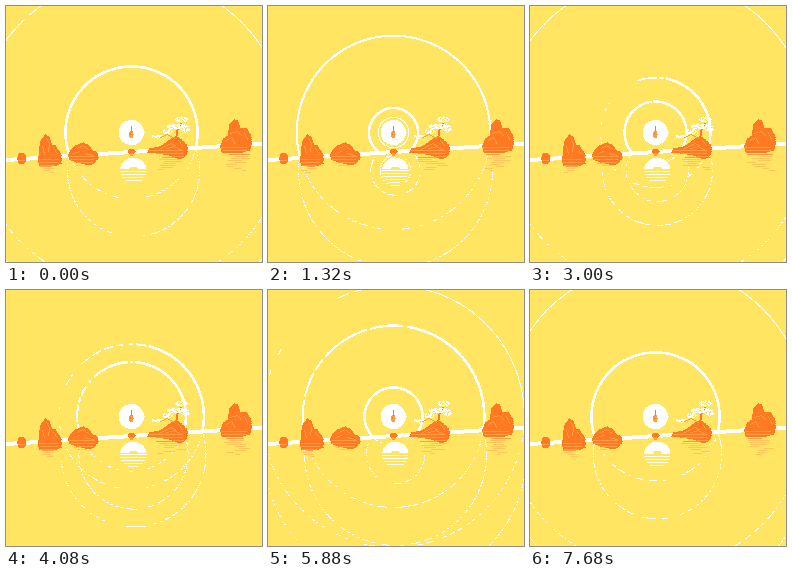
An HTML page with a canvas that plays this animation: 256 px wide and 256 px high, repeating every 7.8 s.

```html
<!DOCTYPE html>
<html lang="en">
<head>
<meta charset="utf-8">
<title>Ripples over still water</title>
<style>
html, body { margin: 0; width: 100%; height: 100%; overflow: hidden; background: #ffe562; }
canvas { display: block; width: 100vw; height: 100vh; image-rendering: pixelated; }
</style>
</head>
<body>
<canvas id="stage" width="256" height="256"></canvas>
<script>
const ctx = document.getElementById('stage').getContext('2d');
const LOOP = 7800, STEP = 120, TAU = Math.PI * 2;
const YELLOW = '#ffe562', WHITE = '#ffffff', ORANGE = '#ff7a22', LIGHT = '#ff9d45', PEACH = '#ffc45a';
const SUN = { x: 125, y: 126 }, MIRROR = { x: 127, y: 164 };

// Ring age in seconds against radius.
const GROWTH = [[0, 13], [1.16, 22.5], [1.9, 30], [3.05, 55], [4.13, 72.5],
  [5.1, 98], [5.96, 132], [6.7, 154], [7.5, 181]];
const RINGS = [
  { start: -0.05, rough: 1 },
  { start: 1.05, rough: 0.25 },
  { start: 4.06, rough: 0 }
];

const clamp = (v, a, b) => Math.min(b, Math.max(a, v));
const horizon = x => 154 - 0.064 * x;

function hash(a, b = 0, c = 0) {
  const s = Math.sin(a * 12.9898 + b * 78.233 + c * 37.719) * 43758.5453;
  return s - Math.floor(s);
}

function rect(x, y, w, h, color) {
  ctx.fillStyle = color;
  ctx.fillRect(Math.round(x), Math.round(y), Math.round(w), Math.round(h));
}

function ellipse(x, y, rx, ry, color, keep) {
  for (let row = Math.ceil(y - ry); row <= y + ry; row++) {
    if (keep && !keep(row)) continue;
    const half = rx * Math.sqrt(Math.max(0, 1 - ((row - y) / ry) ** 2));
    if (half > 0.3) rect(x - half, row, 2 * half + 0.5, 1, color);
  }
}

function line(points, color, w = 1) {
  for (let i = 1; i < points.length; i++) {
    const [x0, y0] = points[i - 1], [x1, y1] = points[i];
    const n = Math.max(1, Math.abs(x1 - x0), Math.abs(y1 - y0));
    for (let k = 0; k <= n; k++) rect(x0 + (x1 - x0) * k / n, y0 + (y1 - y0) * k / n, w, 1, color);
  }
}

// Calls visit(x, y, width) for each row of a filled outline.
function scan(points, visit) {
  const ys = points.map(p => p[1]);
  for (let y = Math.min(...ys); y <= Math.max(...ys); y++) {
    const hits = [];
    points.forEach(([x0, y0], i) => {
      const [x1, y1] = points[(i + 1) % points.length];
      if ((y0 <= y) !== (y1 <= y)) hits.push(x0 + (y - y0) * (x1 - x0) / (y1 - y0));
    });
    hits.sort((a, b) => a - b);
    for (let i = 0; i + 1 < hits.length; i += 2) visit(hits[i], y, hits[i + 1] - hits[i] + 1);
  }
}

function radiusAt(age) {
  for (let i = 1; i < GROWTH.length; i++) {
    const [a0, r0] = GROWTH[i - 1], [a1, r1] = GROWTH[i];
    if (age <= a1) return r0 + (r1 - r0) * (age - a0) / (a1 - a0);
  }
  return 0;
}

function arc(center, r, visit) {
  const n = Math.ceil(r * TAU * 1.6);
  for (let i = 0; i < n; i++) {
    const a = i / n * TAU;
    visit(a, center.x + Math.cos(a) * r, center.y + Math.sin(a) * r);
  }
}

function drawRing(ring, r, id, tick) {
  const base = Math.min(clamp((r - 12) / 4, 1, 2.8), clamp(1 + (125 - r) / 20, 1, 2.8));
  const worn = ring.rough * clamp((r - 28) / 25, 0, 1);
  const wear = a => Math.max(0, Math.cos(a - 3.5)) * worn;
  ctx.fillStyle = WHITE;
  arc(SUN, r, (a, x, y) => {
    if (y > horizon(x)) {
      const row = Math.round(y);
      if (hash(row, Math.floor(x / 7), tick + id) > 0.6) ctx.fillRect(Math.round(x), row, 1, 1);
      return;
    }
    const left = wear(a);
    if (hash(Math.floor(a * 22), id, tick >> 2) < left * 0.85) return;
    const w = Math.max(1, base * (1 - 0.6 * left));
    // Spread the stroke along the radius so the line stays even.
    for (let d = -(w - 1) / 2; d <= (w - 1) / 2 + 0.01; d += 0.5) {
      ctx.fillRect(Math.round(x + Math.cos(a) * d), Math.round(y + Math.sin(a) * d), 1, 1);
    }
  });
  arc(MIRROR, r, (a, x, y) => {
    if (y < horizon(x)) return;
    const row = Math.round(y);
    const visible = 0.5 * (1 - 0.6 * wear(a));
    if (hash(row, Math.floor(x / 6), tick + id * 5) < visible) ctx.fillRect(Math.round(x), row, 1, 1);
  });
}

function drawSun(tick) {
  ellipse(SUN.x, SUN.y, 12.5, 12.5, WHITE);
  ellipse(MIRROR.x, MIRROR.y, 13, 13, WHITE,
    y => y < 163 || (y + (tick >> 3)) % 3 === 0);
  ellipse(127, 162, 4, 2, YELLOW);
  ellipse(125, 128, 2, 3.5, LIGHT);
  line([[125, 120], [125, 125]], ORANGE);
  rect(124, 127, 1, 2, ORANGE);
}

function drawHorizon() {
  for (let x = 0; x < 256; x++) rect(x, horizon(x) - 2, 1, 4, WHITE);
}

// Short horizontal streaks that drift on the water.
function streaks(x, y, w, rows, tick) {
  for (let i = 0; i < rows; i++) {
    const fade = 1 - i / (rows + 2);
    const len = w * fade * (0.45 + 0.5 * hash(i, x, tick >> 1));
    const dx = (w - len) * hash(i, x + 3, tick >> 1);
    rect(x + dx, y + i * 2, len, 1, i < 1 ? LIGHT : PEACH);
  }
}

// A solid mass whose foot is broken by light bands at the waterline.
function rock(points, ...ridges) {
  scan(points, (x, y, w) => {
    rect(x, y, w, 1, ORANGE);
    if (y > horizon(x + w / 2) - 1 && y % 3 === 0) rect(x + 1, y, w * 0.85, 1, LIGHT);
  });
  ridges.forEach(r => line(r, LIGHT));
}

function drawRocks(tick) {
  streaks(33, 160, 16, 4, tick);
  streaks(67, 155, 22, 3, tick);
  streaks(217, 148, 28, 9, tick);
  streaks(150, 151, 31, 7, tick);

  ellipse(15.5, 152, 4.2, 6, ORANGE);
  rect(12, 154, 7, 1, LIGHT);

  rock([[39, 128], [42, 130], [45, 138], [49, 139], [53, 146], [55, 152], [54, 157],
    [47, 160], [33, 160], [32, 154], [33, 144], [34, 135]],
    [[40, 132], [43, 138], [42, 145]], [[47, 142], [51, 147]], [[36, 140], [38, 147]]);

  rock([[77, 136], [82, 139], [85, 143], [90, 146], [92, 151], [89, 155], [84, 159],
    [70, 156], [63, 153], [62, 148], [65, 143], [69, 139]],
    [[71, 142], [76, 139], [82, 143]], [[67, 147], [73, 145]], [[79, 147], [87, 149]]);

  rock([[228, 113], [231, 114], [233, 121], [240, 122], [244, 128], [245, 138], [243, 144],
    [232, 147], [216, 147], [214, 140], [217, 132], [222, 129], [223, 118]],
    [[224, 127], [231, 125], [235, 129]], [[220, 134], [225, 131], [228, 137]], [[238, 126], [241, 133]]);
}

function blossom(x, y, rx, ry) {
  for (let py = -ry; py <= ry; py++) for (let px = -rx; px <= rx; px++) {
    const inside = (px / rx) ** 2 + (py / ry) ** 2 <= 1;
    if (inside && hash(x + px, y + py) > 0.35) rect(x + px, y + py, 1, 1, WHITE);
  }
}

function drawIsland() {
  rock([[141, 146], [143, 142], [153, 140], [160, 136], [166, 131], [172, 131],
    [178, 136], [181, 142], [179, 149], [174, 153], [163, 149], [150, 147]],
    [[153, 143], [164, 137], [169, 139]], [[160, 142], [168, 140], [174, 143]], [[172, 134], [176, 139]]);
  line([[166, 134], [170, 129], [170, 124], [174, 117]], ORANGE, 2);
  line([[168, 132], [161, 128], [154, 131]], LIGHT);
  blossom(175, 113, 6, 3);
  blossom(171, 120, 11, 3);
  blossom(179, 123, 4, 3);
  blossom(161, 125, 5, 3);
  blossom(151, 130, 6, 2);

  ellipse(125, 145, 3.5, 2.5, ORANGE);
  rect(124, 147, 3, 3, LIGHT);
}

function draw(ms) {
  const tick = Math.floor((ms % LOOP) / STEP);
  const t = tick * STEP / 1000;
  rect(0, 0, 256, 256, YELLOW);
  RINGS.forEach((ring, id) => {
    const age = (t - ring.start + LOOP / 1000) % (LOOP / 1000);
    const r = radiusAt(age);
    if (r > 14) drawRing(ring, r, id, tick);
  });
  drawHorizon();
  drawSun(tick);
  drawRocks(tick);
  drawIsland();
}

const begin = performance.now();
function loop() {
  draw(performance.now() - begin);
  requestAnimationFrame(loop);
}
loop();
</script>
</body>
</html>
```
